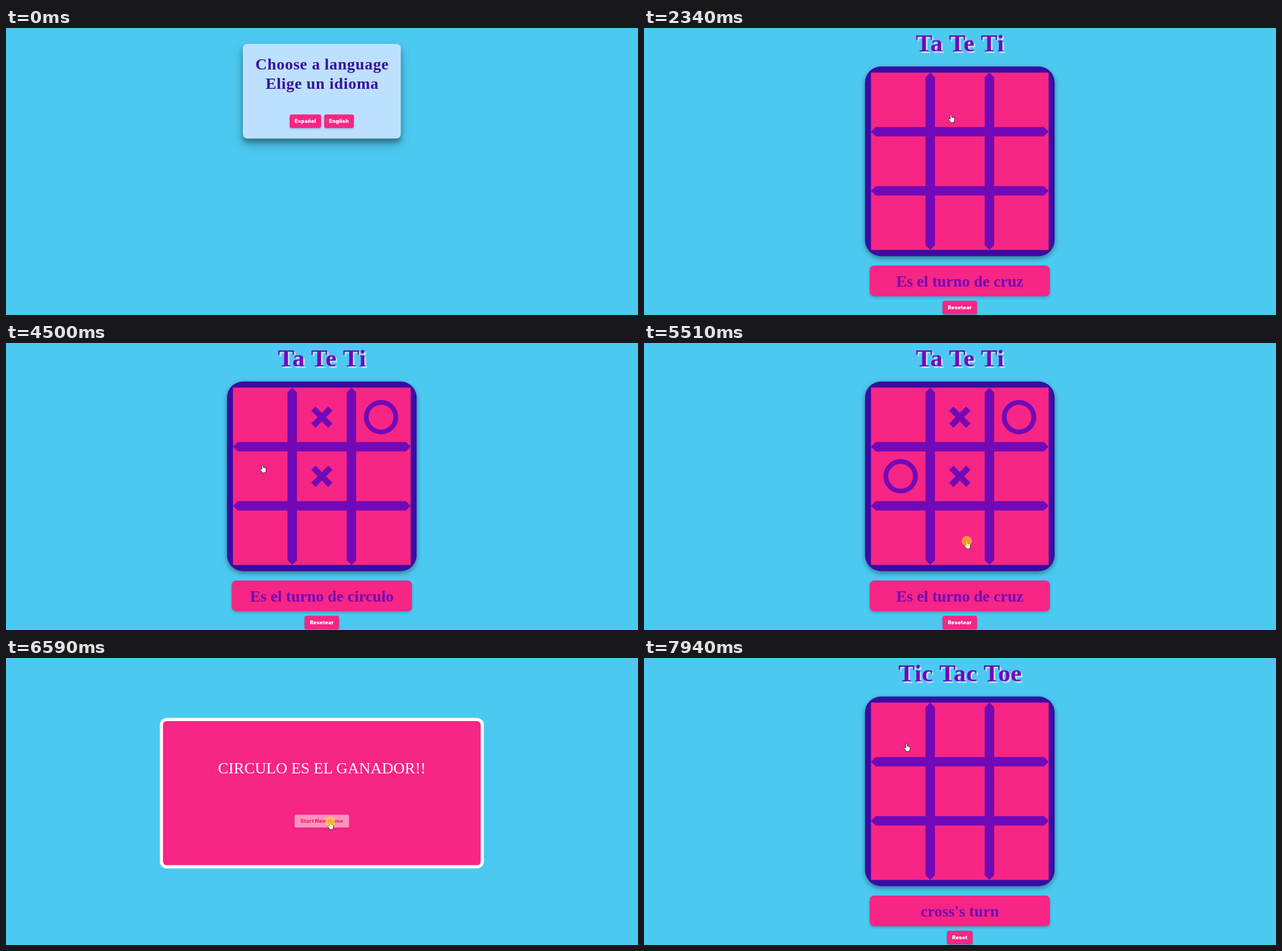
An HTML page that plays this animation: 1110 by 505 pixels, repeating every 8 s.

```html
<!DOCTYPE html>
<html lang="es">
<head>
<meta charset="utf-8">
<title>Ta Te Ti</title>
<style>
  html, body { margin: 0; width: 100%; height: 100%; overflow: hidden; background: #4cc9f0; }
  svg { display: block; width: 100vw; height: 100vh; }
  text { font-family: "Liberation Serif", "Times New Roman", serif; text-anchor: middle; }
  .bold { font-weight: bold; }
  .head { font-weight: bold; letter-spacing: .7px; }
  .btn text { font: 900 9px Inter, "Liberation Sans", sans-serif; letter-spacing: .2px; fill: #fff; }
  .btn .face { fill: #f72585; stroke: #f72585; stroke-width: .7; }
  .btn.hover { opacity: .5; }
  .btn.hover .face { fill: #fff; }
  .btn.hover text { fill: #ff3038; }
</style>
</head>
<body>
<svg id="stage" viewBox="0 0 1110 505"></svg>
<script>
const PINK = '#f72585', PURPLE = '#7209b7', INDIGO = '#3a0ca3', PALE = '#bde0fe';
const LOOP = 8000, MID = 554.7;
const PITCH = 104, BOARD = { x: MID - 1.5 * PITCH, y: 78.5, size: 3 * PITCH };
const stage = document.getElementById('stage');

function add(parent, tag, attrs = {}, text) {
  const el = document.createElementNS('http://www.w3.org/2000/svg', tag);
  for (const k in attrs) el.setAttribute(k, attrs[k]);
  if (text) el.textContent = text;
  return parent.appendChild(el);
}
const group = (parent, cls = '') => add(parent, 'g', { class: cls });
const show = (el, on) => el.setAttribute('visibility', on ? 'inherit' : 'hidden');

// Everything on the page is centred on MID unless cx says otherwise.
function box(parent, y, width, height, rx, fill, cx = MID, cls = '') {
  return add(parent, 'rect', { x: cx - width / 2, y, width, height, rx, fill, class: cls });
}
function shadow(parent, y, w, h, rx, dy, blur, alpha, cx) {
  box(parent, y + dy, w, h, rx, '#000', cx).style.cssText = `filter:blur(${blur}px);opacity:${alpha}`;
}
function label(parent, y, size, fill, text, cls = 'bold', x = MID) {
  return add(parent, 'text', { x, y, 'font-size': size, fill, class: cls }, text);
}
function button(parent, y, w, text, cx = MID) {
  const h = 23.8, g = group(parent, 'btn');
  shadow(g, y, w, h, 3, 1.4, 1.7, .2, cx);
  box(g, y + .35, w - .7, h - .7, 2.8, PINK, cx, 'face');
  add(g, 'text', { x: cx, y: y + h / 2 + 3.2 }, text);
  const hit = (px, py) => Math.abs(px - cx) <= w / 2 && py >= y && py <= y + h;
  return { el: g, home: parent, hit };
}

// Language picker
const picker = group(stage);
shadow(picker, 28, 277.5, 166.5, 8, 9.7, 9.7, .25);
shadow(picker, 28, 277.5, 166.5, 8, 7, 3.5, .25);
box(picker, 28, 277.5, 166.5, 8, PALE);
label(picker, 73.3, 28, INDIGO, 'Choose a language', 'head', MID + .6);
label(picker, 107.2, 28, INDIGO, 'Elige un idioma', 'head', MID + .6);
const spanish = button(picker, 152.2, 55.2, 'Español', 525.9);
const english = button(picker, 152.2, 52.2, 'English', 584.9);

// Game board
const game = group(stage);
const titles = [[2.8, PALE], [0, PURPLE]].map(([d, fill]) =>
  label(game, 41 + d, 43, fill, '', 'head', MID + .6 + d));
shadow(game, 67.8, 333, 333.6, 28, 3.5, 5, .4);
box(game, 67.8, 333, 333.6, 28, INDIGO);
box(game, BOARD.y, BOARD.size, BOARD.size, 0, PINK);
const bar = 'M-156 0l8.3-8.3H147.7L156 0l-8.3 8.3H-147.7z';
const middle = BOARD.y + BOARD.size / 2;
for (const d of [-PITCH / 2, PITCH / 2]) {
  add(game, 'path', { d: bar, fill: PURPLE, transform: `translate(${MID} ${middle + d})` });
  add(game, 'path', { d: bar, fill: PURPLE, transform: `translate(${MID + d} ${middle}) rotate(90)` });
}
shadow(game, 418, 316.5, 54, 8, 2, 2.8, .24);
box(game, 418, 316.5, 54, 8, PINK);
const status = label(game, 454.7, 27.75, PURPLE, '');
const resetEs = button(game, 480, 60.6, 'Resetear');
const resetEn = button(game, 480, 45.3, 'Reset');

// Winner panel
const winner = group(stage);
box(winner, 105.4, 569, 264.8, 12, '#fff');
box(winner, 111, 558, 253.6, 6.5, PINK);
label(winner, 203, 27.75, '#fff', 'CIRCULO ES EL GANADOR!!', '');
const again = button(winner, 275.2, 97, 'Start New Game');
const buttons = [spanish, english, again];

// Pointer
const pointer = group(stage);
const ink = { fill: '#fff', stroke: '#000', 'stroke-width': .75, 'stroke-linejoin': 'round' };
const arrow = add(pointer, 'path', { ...ink, d: 'M0 0V10.4L2.4 8.2 4 11.6 5.6 10.9 4.1 7.5H7.3z' });
const hand = add(pointer, 'path', { ...ink,
  d: 'M-1.3 8.5V1.2a1.2 1.2 0 0 1 2.4 0V5q1.2-.6 1.9.4 1.3-.5 1.8.6 1.4-.2 1.4 1V10q0 1.6-1 2.8V14.3H-.6Q-1.2 12-3.8 9.2q-1-1.3 0-1.9 1-.3 2.5 1.2z' });
const glow = add(pointer, 'circle', { cy: .6, r: 9, fill: '#ffee00', opacity: .55 });

// The session as it was played: pointer moves and presses
const ENTER = 250, moves = [], presses = [];
let spot = { x: 992, y: 462 };
function move(start, end, x, y, bow = 0) {
  const dx = x - spot.x, dy = y - spot.y;
  const bend = { x: spot.x + dx / 2 - dy * bow, y: spot.y + dy / 2 + dx * bow };
  moves.push({ start, end, from: spot, bend, to: spot = { x, y } });
}
const press = (at, hold = 130) => presses.push({ at, release: at + hold, ...spot });
const TAP = 70;

move(ENTER, 720, 395, 223);
move(1050, 1600, 525, 168.5, .25);
press(1740, TAP);
move(2200, 2480, 553, 136);
press(2550, TAP);
move(2690, 3150, 648, 126);
press(3220, TAP);
move(3310, 3420, 628, 115.5);
move(3620, 3980, 541, 224);
press(4050, TAP);
move(4190, 4640, 424, 211);
press(4700, TAP);
move(4840, 5440, 567, 348, -.5);
press(5510);
move(6120, 6390, 569, 287.5);
press(6590);
move(6720, 7270, 597, 160.5, .2);
press(7540);
move(7670, 7940, 461, 150);

// Each press on the board leaves a mark; the last one ends the round.
const turns = presses.slice(1, 5);
const [startAt, winAt, againAt, englishAt] =
  [presses[0], ...presses.slice(-3)].map(p => p.release);
const cross = 'M-11.2-18.7L0-7.5 11.2-18.7 18.7-11.2 7.5 0 18.7 11.2 11.2 18.7 0 7.5-11.2 18.7-18.7 11.2-7.5 0-18.7-11.2z';
const snap = (v, origin) => origin + (Math.floor((v - origin) / PITCH) + .5) * PITCH;
const marks = turns.map((p, i) => {
  const transform = `translate(${snap(p.x, BOARD.x)} ${snap(p.y, BOARD.y)})`;
  return i % 2
    ? add(game, 'circle', { r: 26, fill: 'none', stroke: PURPLE, 'stroke-width': 8.4, transform })
    : add(game, 'path', { d: cross, fill: PURPLE, transform });
});

function pointerAt(t) {
  const m = moves.filter(m => t >= m.start).pop() || moves[0];
  const u = Math.max(0, Math.min(1, (t - m.start) / (m.end - m.start)));
  const k = u * u * (3 - 2 * u), j = 1 - k;
  const along = a => j * j * m.from[a] + 2 * j * k * m.bend[a] + k * k * m.to[a];
  return [along('x'), along('y')];
}

function sceneAt(t) {
  if (t >= englishAt) return game;
  if (t >= againAt) return picker;
  if (t >= winAt) return winner;
  return t >= startAt ? game : picker;
}

function render(t) {
  const [x, y] = pointerAt(t);
  const scene = sceneAt(t), inEnglish = t >= englishAt, seen = t >= ENTER;
  for (const s of [picker, game, winner]) show(s, s === scene);

  for (const el of titles) el.textContent = inEnglish ? 'Tic Tac Toe' : 'Ta Te Ti';
  const placed = inEnglish ? 0 : turns.filter(p => t >= p.release).length;
  marks.forEach((el, i) => show(el, i < placed));
  status.textContent = inEnglish ? "cross's turn" : 'Es el turno de ' + (placed % 2 ? 'circulo' : 'cruz');
  show(resetEs.el, !inEnglish);
  show(resetEn.el, inEnglish);

  let active = scene === game && x > BOARD.x && x < BOARD.x + BOARD.size;
  for (const b of buttons) {
    const over = seen && scene === b.home && b.hit(x, y);
    b.el.classList.toggle('hover', over);
    active = active || over;
  }
  show(pointer, seen);
  show(hand, active && seen);
  show(arrow, !active && seen);
  show(glow, presses.some(p => t >= p.at && t < p.release));
  pointer.setAttribute('transform', `translate(${x.toFixed(2)} ${y.toFixed(2)})`);
}

const began = performance.now();
function tick() {
  render((performance.now() - began) % LOOP);
  requestAnimationFrame(tick);
}
tick();
</script>
</body>
</html>
```
